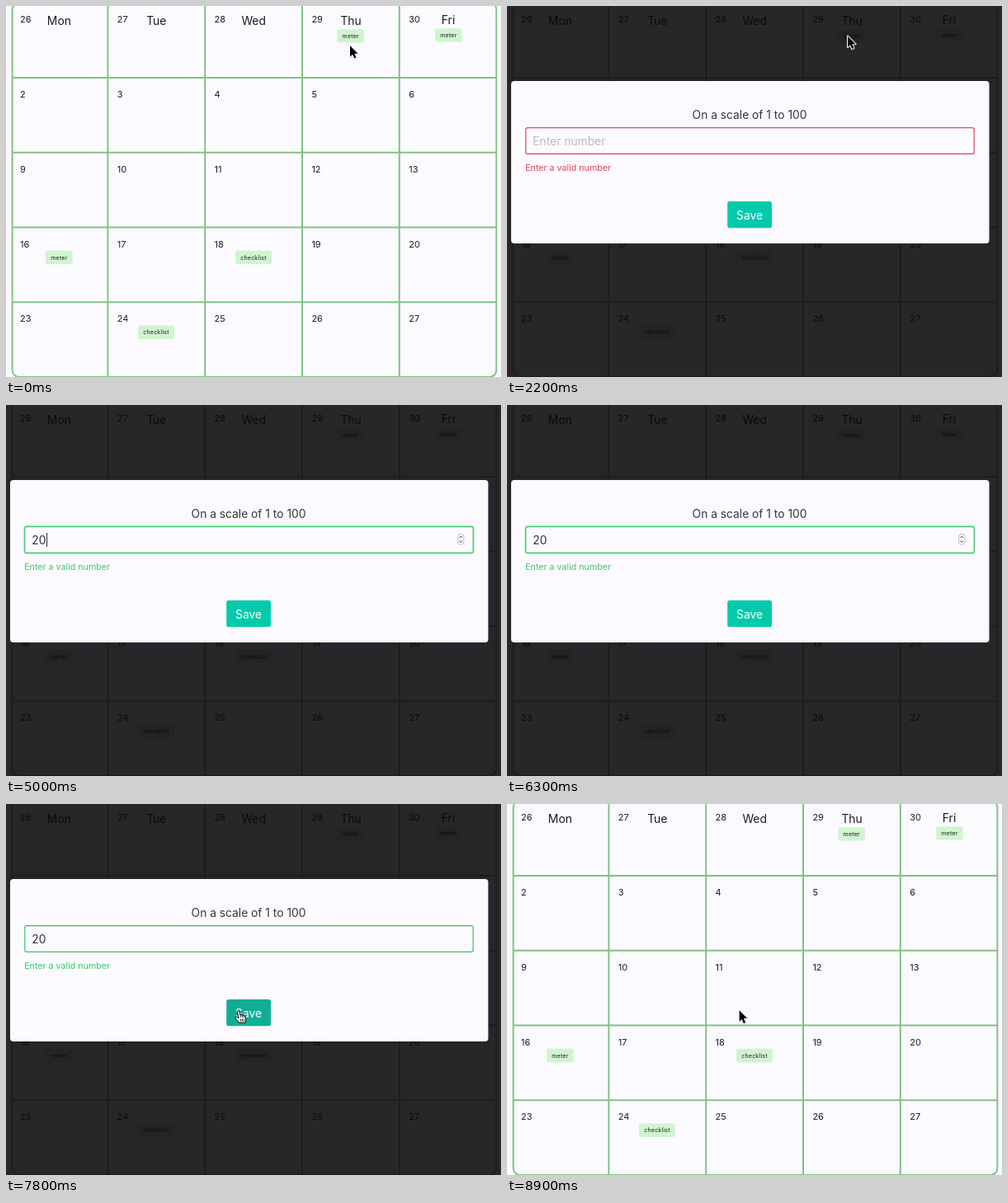
Recreate the animation shown at these times as an HTML page. Size 600 px wide and 450 px high, loop 9000 ms.

```html
<!DOCTYPE html>
<html lang="en">
<head>
<meta charset="utf-8">
<title>Calendar meter entry</title>
<style>
  html, body { margin: 0; width: 100%; height: 100%; overflow: hidden; background: #fbfaff; }
  svg { display: block; width: 600px; height: 450px; font-family: Inter, Roboto, sans-serif; fill: #1c1b1e; }
  .mid { text-anchor: middle; }
  .date { font-size: 11px; }
  .day { font-size: 13.9px; }
  .tag { font-size: 7px; letter-spacing: .25px; }
  .lines { fill: none; stroke: #81c284; stroke-width: 2; }
  #modal { font-size: 13.8px; --state: #dc405f; }
  #modal.valid { --state: #38c768; }
  #field { fill: #fcfaff; stroke: var(--state); stroke-width: 1.2; }
  #ring { fill: none; stroke: var(--state); stroke-opacity: .3; stroke-width: 3; }
  #help { font-size: 10.7px; fill: var(--state); }
  #cursor path { stroke-linejoin: round; stroke-linecap: round; }
</style>
</head>
<body>
<svg viewBox="0 0 600 450">
  <rect width="600" height="450" fill="#fbfaff"/>
  <g id="calendar"></g>
  <g id="modal">
    <rect width="600" height="450" fill="#070406" fill-opacity=".86"/>
    <rect x="5" y="91" width="579.5" height="197" rx="4" fill="#fcfaff"/>
    <text class="mid" x="294" y="137" fill="#37353a">On a scale of 1 to 100</text>
    <rect id="ring" x="22.5" y="147.3" width="544" height="32.4" rx="3"/>
    <rect id="field" x="22.8" y="147.6" width="543.4" height="31.8" rx="2.5"/>
    <path id="edge" d="M25 147.6H564" stroke="#87848a" stroke-opacity=".65"/>
    <text id="value" x="31.3" y="168.7"></text>
    <path id="caret" d="M0 155V172" stroke="#29272b"/>
    <g id="spinner" fill="none" stroke="#aaa8ad" stroke-width=".8">
      <rect x="547.7" y="156.5" width="7.2" height="12.6" rx="3.4" fill="#fff"/>
      <path d="M549.7 161l1.6-1.8 1.6 1.8M549.7 164.7l1.6 1.8 1.6-1.8" stroke="#333" stroke-width="1"/>
    </g>
    <text id="help" x="22.2" y="199.7">Enter a valid number</text>
    <rect id="save" x="267.2" y="237" width="53.8" height="32.3" rx="2.5"/>
    <text class="mid" x="294" y="258.8" fill="#fff">Save</text>
  </g>
  <g id="cursor">
    <g id="arrow">
      <path d="M0 0V13.6L3.1 10.7 5.2 15.6 7.5 14.6 5.4 9.8H9.6Z" transform="translate(.6 1)" fill="#000" fill-opacity=".18" stroke="#000" stroke-opacity=".1" stroke-width="2"/>
      <path d="M0 0V13.6L3.1 10.7 5.2 15.6 7.5 14.6 5.4 9.8H9.6Z" fill="#000" stroke="#fff" stroke-width="2" paint-order="stroke"/>
    </g>
    <g id="hand" fill="#fff" stroke="#000">
      <path d="M-1.3 1.2Q-.2-.9 1.1 1L2.3 5.4Q3.4 4.4 4.3 5.8Q5.6 4.9 6.4 6.4Q8 5.7 8.7 7.7Q9.7 11 8.3 14.9H1.1Q-1 12.4-3.7 9.7Q-4.2 7.6-2.1 8L.2 9.2Z"/>
      <path d="M2.3 5.4L2.9 8M4.3 5.8L4.9 8.2M6.4 6.4L6.8 8.4M3 10.5V13M4.9 10.5V13M6.7 10.5V13" stroke-width=".8"/>
    </g>
    <g id="beam" fill="none">
      <path d="M-3-7Q0-7 0-5V5Q0 7-3 7M3-7Q0-7 0-5M3 7Q0 7 0 5M-1.5 1.5H1.5" stroke="#fff" stroke-width="2.6"/>
      <path d="M-3-7Q0-7 0-5V5Q0 7-3 7M3-7Q0-7 0-5M3 7Q0 7 0 5M-1.5 1.5H1.5" stroke="#000" stroke-width="1.1"/>
    </g>
  </g>
</svg>
<script>
const $ = id => document.getElementById(id);
const LOOP = 9000, STEP = 100;
const T = { open: 2200, focus: 3600, first: 4200, second: 4750, wake: 6600, press: 7500, close: 7900 };

// time, x, y of the pointer tip
const PATH = [
  [0, 417, 48], [400, 417, 48], [1100, 412, 38.2], [2100, 412, 38.2],
  [2200, 413, 36.5], [2600, 413, 36.5], [3000, 411, 72], [3400, 397, 157],
  [6500, 397, 157], [6600, 390, 157.5], [7000, 315, 222], [7250, 281.6, 250.3], [9000, 281.6, 250.3]
];

function buildCalendar() {
  const text = (cls, x, y, s) => `<text class="${cls}" x="${x}" y="${y}">${s}</text>`;
  const tag = (x, y, s) => {
    const w = s === "meter" ? 32.6 : 44;
    return `<rect x="${x - w / 2}" y="${y - 8.2}" width="${w}" height="16.4" rx="3" fill="#d0f4d0"/>` +
      text("tag mid", x, y + 2.6, s);
  };
  const xs = [123.4, 241.2, 359, 476.8], ys = [87, 177.8, 268.5, 359.3];
  let out = `<g class="lines"><rect x="7.6" y="-3.7" width="586.8" height="453.6" rx="8"/><path d="` +
    xs.map(x => `M${x}-4V450`).join("") + ys.map(y => `M7 ${y}H595`).join("") + `"/></g>`;
  [26, 2, 9, 16, 23].forEach((start, row) => {
    for (let col = 0; col < 5; col++)
      out += text("date", 17 + col * 117.8, 20.3 + row * 90.75, start + col);
  });
  ["Mon", "Tue", "Wed", "Thu", "Fri"].forEach((day, i) => {
    out += text("day mid", 64.4 + i * 117.9, i === 4 ? 21.7 : 22.7, day);
  });
  out += tag(417.8, 36.4, "meter") + tag(536.4, 35.4, "meter") + tag(64.4, 305, "meter") +
    tag(300, 305, "checklist") + tag(182, 395.8, "checklist");
  $("calendar").innerHTML = out;
}

function pointer(t) {
  let i = 1;
  while (i < PATH.length - 1 && PATH[i][0] < t) i++;
  const [t0, x0, y0] = PATH[i - 1], [t1, x1, y1] = PATH[i];
  const p = (t - t0) / (t1 - t0), e = p * p * (3 - 2 * p);
  return [x0 + (x1 - x0) * e, y0 + (y1 - y0) * e];
}

function show(id, on) { $(id).style.display = on ? "" : "none"; }

function draw(t) {
  const open = t >= T.open && t < T.close;
  const focused = t >= T.focus && t < T.press;
  const typed = t >= T.second ? "20" : t >= T.first ? "2" : "";
  const [x, y] = pointer(t);
  const inside = (l, top, r, b) => x > l && x < r && y > top && y < b;
  const overField = open && inside(22, 147, 567, 180);
  const overSave = open && inside(267, 237, 321, 269);
  const overTag = !open && inside(401, 28, 434, 45);

  show("modal", open);
  $("modal").classList.toggle("valid", typed !== "");
  show("ring", focused);
  show("edge", !focused);
  show("spinner", focused || overField);
  $("value").textContent = typed || "Enter number";
  $("value").setAttribute("fill", typed ? "#333136" : "#bcbabf");
  $("save").setAttribute("fill", t >= T.press ? "#11ad93" : overSave ? "#04bfa2" : "#03caab");

  const since = t - (typed === "20" ? T.second : typed ? T.first : T.focus);
  show("caret", focused && since % 1000 < 500);
  $("caret").setAttribute("transform", `translate(${[32.3, 40.8, 49.6][typed.length]} 0)`);

  const kind = overField ? "beam" : overSave || overTag ? "hand" : "arrow";
  for (const id of ["arrow", "hand", "beam"]) show(id, id === kind);
  show("cursor", t < T.first || t >= T.wake);
  $("cursor").setAttribute("transform", `translate(${x} ${y})`);
}

buildCalendar();
const begin = performance.now();
function tick() {
  const t = (performance.now() - begin) % LOOP;
  draw(Math.floor(t / STEP) * STEP);
  requestAnimationFrame(tick);
}
tick();
</script>
</body>
</html>
```
